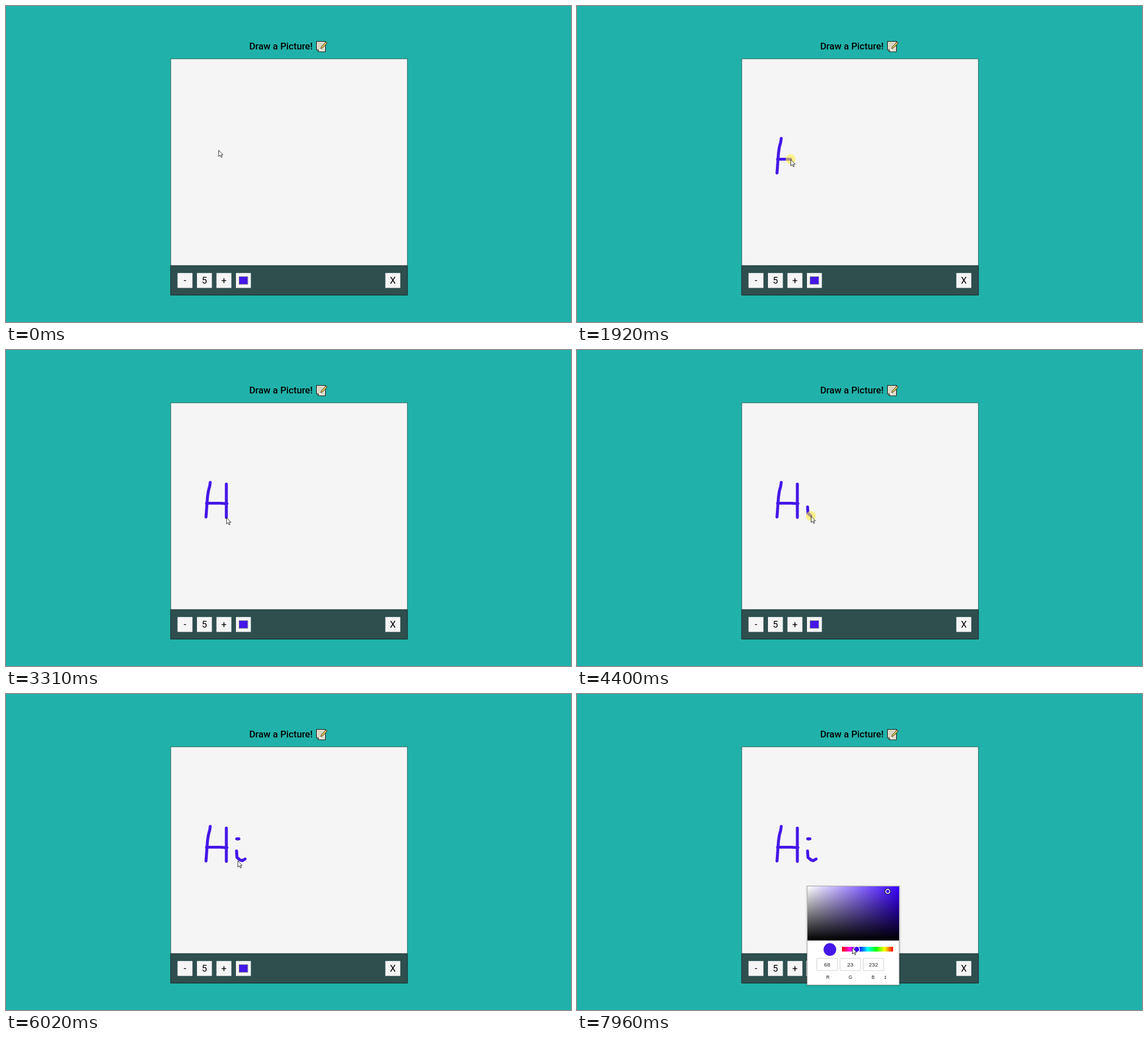
An HTML page that plays this animation: 1000x560 px, repeating every 8000 ms.

```html
<!DOCTYPE html>
<html lang="en">
<head>
<meta charset="utf-8">
<title>Draw a Picture!</title>
<style>
  html, body { margin: 0; width: 100%; height: 100%; overflow: hidden; background: #20b2aa; }
  svg { display: block; width: 100%; height: 100%; }
  text { font-family: Roboto, Arial, sans-serif; font-size: 16.6px; fill: #000; }
  .mid { text-anchor: middle; }
  .small text { font-family: "Liberation Sans", Arial, sans-serif; font-size: 9.7px; fill: #222; text-anchor: middle; }
  .small .label { font-size: 8.3px; }
</style>
</head>
<body>
<svg viewBox="0 0 1000 560">
  <defs>
    <linearGradient id="tint"><stop stop-color="#fff"/><stop offset="1" stop-color="#3700ff"/></linearGradient>
    <linearGradient id="shade" x2="0" y2="1"><stop stop-color="#000" stop-opacity="0"/><stop offset="1"/></linearGradient>
    <linearGradient id="hues">
      <stop stop-color="#f00"/><stop offset=".167" stop-color="#f0f"/><stop offset=".333" stop-color="#00f"/>
      <stop offset=".5" stop-color="#0ff"/><stop offset=".667" stop-color="#0f0"/><stop offset=".833" stop-color="#ff0"/>
      <stop offset="1" stop-color="#f00"/>
    </linearGradient>
  </defs>

  <rect width="1000" height="560" fill="#20b2aa"/>
  <text x="430.4" y="77.4" font-weight="500">Draw a Picture!</text>

  <g id="memo" stroke-linejoin="round">
    <path d="M549.6 62.8H565.4V81H553.4L549.6 77.2Z" fill="#f3efdc" stroke="#1c1c1c" stroke-width="1.2"/>
    <path d="M549.8 77.2H553.4V80.8Z" fill="#c9c4ae" stroke="#1c1c1c" stroke-width=".7"/>
    <path d="M552 66.3H562M552 69.1H560M552 71.9H558M552 74.7H556.5M558.5 77.3H563" stroke="#a5a190" stroke-width=".9"/>
    <path d="M557 75.6L558.2 72.3L565.6 64.2L568 66.3L560.4 74.4Z" fill="#e4c64f" stroke="#1c1c1c" stroke-width=".9"/>
    <path d="M565.6 64.2L566.6 63.2L569 65.3L568 66.3Z" fill="#d9d9d9" stroke="#1c1c1c" stroke-width=".7"/>
  </g>

  <rect x="291.5" y="93.5" width="419" height="367" fill="#f5f5f5" stroke="#2f7a74" stroke-width="1.3"/>
  <rect x="291.5" y="460.3" width="419" height="52" fill="#2f4f4f" stroke="#1d3838" stroke-width="1.4"/>
  <g id="buttons"></g>
  <rect x="412.5" y="479.7" width="15.4" height="13.4" fill="#4417e8" stroke="#777" stroke-width=".8"/>
  <g id="focus" fill="none">
    <rect x="406.3" y="472.6" width="27.8" height="27.6" rx="1.6" stroke="#fff" stroke-width="1.1"/>
    <rect x="407.5" y="473.8" width="25.4" height="25.2" rx="1.2" stroke="#1a1a1a" stroke-width="1.3"/>
  </g>

  <path id="ink" fill="none" stroke="#4417e8" stroke-width="5.2" stroke-linecap="round" stroke-linejoin="round"/>

  <g id="shadow" fill="none" stroke="#000"></g>
  <g id="picker" class="small">
    <rect x="407.5" y="340.5" width="162.6" height="175" fill="#fff" stroke="#aaa" stroke-width=".9"/>
    <rect x="408" y="341" width="162" height="95.8" fill="url(#tint)"/>
    <rect x="408" y="341" width="162" height="95.8" fill="url(#shade)"/>
    <circle cx="550" cy="349.8" r="5.4" fill="#000"/>
    <circle cx="550" cy="349.8" r="3.7" fill="#4417e8" stroke="#fff" stroke-width="1.5"/>
    <circle cx="447.6" cy="452.8" r="11.2" fill="#4417e8"/>
    <rect x="469" y="448" width="90.4" height="8.4" fill="url(#hues)"/>
    <circle cx="495" cy="452.4" r="5.2" fill="#3700ff" stroke="#fff" stroke-width="1.4"/>
    <g id="fields"></g>
    <path d="M544 501.2L545.8 499L547.6 501.2ZM544 503L545.8 505.2L547.6 503Z" fill="#333"/>
  </g>

  <circle id="glow" r="8.8" fill="#ffee3c" fill-opacity=".58"/>
  <path id="cursor" d="M.4 .6V11.8L3 9.4L4.9 13.5L6.6 12.7L4.8 8.8H8.1Z" fill="#fff" stroke="#111" stroke-width=".85" stroke-linejoin="round"/>
</svg>
<script>
const LOOP = 8000;
const $ = id => document.getElementById(id);
const show = (id, on) => $(id).setAttribute("visibility", on ? "visible" : "hidden");

// Bursts of movement: first change, last change, number of changes
const bursts = [
  [150, 460, 5], [610, 1380, 11], [1460, 1610, 3], [1760, 2450, 10],
  [2700, 3310, 9], [3480, 3630, 3], [3860, 4630, 11], [4700, 5170, 7],
  [5320, 5320, 1], [5560, 6330, 11], [6410, 7180, 11], [7280, 7960, 10]
];
const ticks = [0];
for (const [from, to, n] of bursts)
  for (let i = 0; i < n; i++)
    ticks.push(from + (n > 1 ? Math.round((to - from) * i / (n - 1) / 10) * 10 : 0));

// Pointer track: time, x, y, button (0 up, 1 drawing, 2 clicking)
const track = `0 376 255 0|150 374 252 0|460 361.5 235 0
610 361.5 234.5 1|760 360.6 241 1|920 358.2 250 1|1000 356.8 259 1|1070 356 268 1|1150 355.2 279 1|1300 354 296 1
1380 354 296 0|1460 354 288 0|1610 355 271.5 0
1760 355 271.5 1|1910 378 271.5 1|1990 387 272 1|2070 391 272 1|2140 391 272 0|2450 390 237 0
2700 390 237.5 1|3230 390 296.5 1|3310 390 296.5 0|3480 394 293 0|3630 408 278 0
3860 408 278 1|4170 408.8 289.5 1|4400 414 294 1|4480 418.5 295.4 1|4630 423.2 292.4 1
4700 423.2 292 0|5170 410 257.5 0
5320 409.5 257 1|5560 408.3 256.6 1|5710 412.2 256.6 1|5790 412.2 257.5 0|5870 412 264 0
6020 410 295 0|6100 396 334 0|6180 376 376 0|6250 376 411 0|6330 388 437 0
6410 401 464 0|6560 414 488 0|6720 416 490 0|6800 416 490 2|6950 416 490 0
7180 416 490 0|7960 487 449 0`.split(/[|\n]/).map(row => row.split(" ").map(Number));

$("buttons").innerHTML = [[316.8, "-"], [351.2, "5"], [385.7, "+"], [420.2, ""], [684.6, "X"]].map(([x, s]) =>
  `<rect x="${x - 13.2}" y="473.2" width="26.4" height="26.4" fill="#f5f5f5"/>` +
  `<text class="mid" x="${x}" y="492.2">${s}</text>`).join("");

$("shadow").innerHTML = [.25, .11, .06, .03].map((a, i) =>
  `<rect x="${407.5 - i * .8}" y="${340.5 - i * .4}" width="${163 + i * 1.8}" height="${175.4 + i * 1.4}" rx="${i}" stroke-opacity="${a}"/>`).join("");

$("fields").innerHTML = [["R", 68], ["G", 23], ["B", 232]].map(([name, value], i) => {
  const x = 424.5 + i * 41;
  return `<rect x="${x}" y="468.5" width="36.4" height="21.6" rx=".8" fill="#fff" stroke="#ccc" stroke-width=".9"/>` +
    `<text x="${x + 18.2}" y="482.8">${value}</text>` +
    `<text class="label" x="${444 + i * 40}" y="505.2">${name}</text>`;
}).join("");

function pointerAt(t) {
  let i = track.length - 1;
  while (track[i][0] > t) i--;
  const a = track[i], b = track[i + 1] || a;
  const p = b === a ? 0 : (t - a[0]) / (b[0] - a[0]);
  return { i, x: a[1] + (b[1] - a[1]) * p, y: a[2] + (b[2] - a[2]) * p, button: a[3] };
}

function inkPath({ i: last, x, y, button }) {
  let d = "", down = false;
  for (const [, px, py, pen] of track.slice(0, last + 1)) {
    if (pen === 1) d += `${down ? "L" : "M"}${px} ${py}${down ? "" : `L${px} ${py}`}`;
    down = pen === 1;
  }
  return button === 1 ? `${d}L${x} ${y}` : d;
}

function draw(time) {
  const t = ticks.findLast(k => k <= time);
  const pointer = pointerAt(t);
  const place = `translate(${pointer.x} ${pointer.y})`;
  $("ink").setAttribute("d", inkPath(pointer));
  $("cursor").setAttribute("transform", place);
  $("glow").setAttribute("transform", place);
  show("glow", pointer.button > 0);
  show("focus", t >= 6800);
  show("shadow", t >= 7100);
  show("picker", t >= 7180);
}

const start = performance.now();
function frame() {
  draw((performance.now() - start) % LOOP);
  requestAnimationFrame(frame);
}
frame();
</script>
</body>
</html>
```
